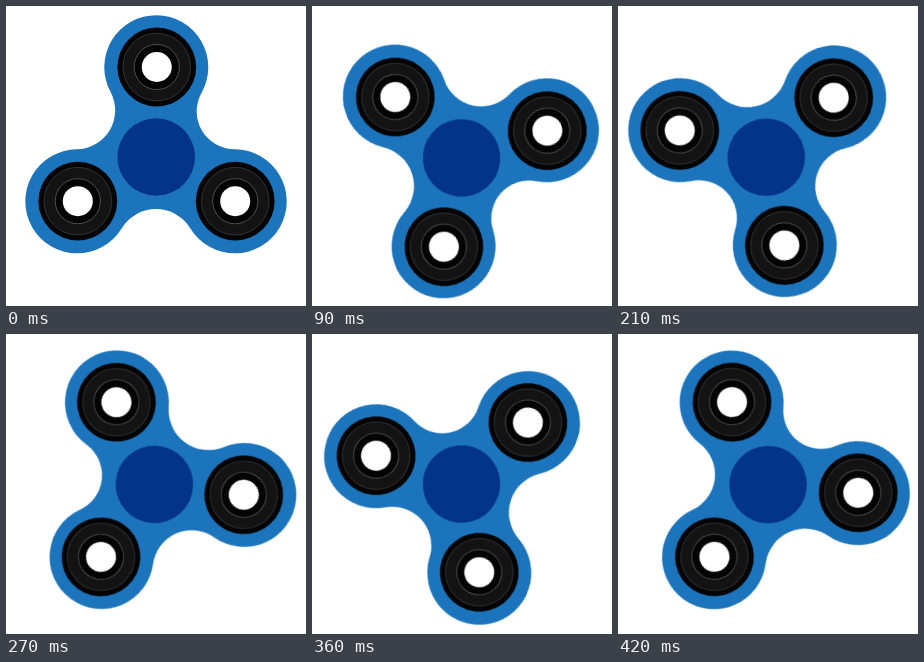
Write an HTML page that moves like this. It is 300 by 300 pixels and loops after 0.45 s.

```html
<!DOCTYPE html>
<html lang="en">
<head>
<meta charset="utf-8">
<title>Fidget spinner</title>
<style>
  html, body { margin: 0; width: 100%; height: 100%; overflow: hidden; background: #fff; }
  svg { display: block; width: 100%; height: 100%; }
  #spinner {
    transform-origin: 149.2px 151px;
    animation: spin 450ms steps(15, end) infinite;
  }
  @keyframes spin { to { transform: rotate(360deg); } }
</style>
</head>
<body>
<svg viewBox="0 0 300 300">
  <defs>
    <g id="bearing">
      <circle r="39.4" fill="#040404"/>
      <circle r="33.8" fill="#131313" stroke="#3c3c3c" stroke-width=".8"/>
      <circle r="22.6" fill="#040404" stroke="#555" stroke-width=".9"/>
      <circle r="15" fill="#fff"/>
    </g>
  </defs>
  <g id="spinner">
    <g transform="translate(149.2 151)">
      <path id="body" fill="#1c75bc" transform="translate(-.5 .2)"/>
      <circle cx="1" r="38.8" fill="#03348a"/>
      <g id="bearings"></g>
    </g>
  </g>
</svg>
<script>
  const LOBE = 52;
  // Clockwise from the top: angle in degrees, distance from the pivot,
  // radius of the concave neck leading to the next arm.
  const arms = [[1, 90, 38], [118.9, 91.4, 40], [240.3, 89.1, 39]].map(([deg, dist, fillet]) => {
    const a = deg * Math.PI / 180;
    return { x: dist * Math.sin(a), y: -dist * Math.cos(a), fillet };
  });

  // Points where the neck arc between two lobes touches each of them.
  function touchPoints(a, b) {
    const dx = b.x - a.x, dy = b.y - a.y, gap = Math.hypot(dx, dy);
    const reach = LOBE + a.fillet, h = Math.sqrt(reach ** 2 - gap ** 2 / 4);
    const cx = (a.x + b.x) / 2 + dy / gap * h, cy = (a.y + b.y) / 2 - dx / gap * h;
    const toward = ({ x, y }) => [x + (cx - x) * LOBE / reach, y + (cy - y) * LOBE / reach];
    return [toward(a), toward(b)];
  }

  const arc = (r, large, sweep, p) => `A${r} ${r} 0 ${large} ${sweep} ${p}`;
  const necks = arms.map((arm, i) => touchPoints(arm, arms[(i + 1) % 3]));
  const outline = necks.map(([, to], i) =>
    arc(arms[i].fillet, 0, 0, to) + arc(LOBE, 1, 1, necks[(i + 1) % 3][0])).join('');
  document.getElementById('body').setAttribute('d', `M${necks[0][0]}${outline}Z`);

  document.getElementById('bearings').innerHTML = arms.map(({ x, y }) =>
    `<use href="#bearing" x="${x}" y="${y}"/>`).join('');
</script>
</body>
</html>
```
